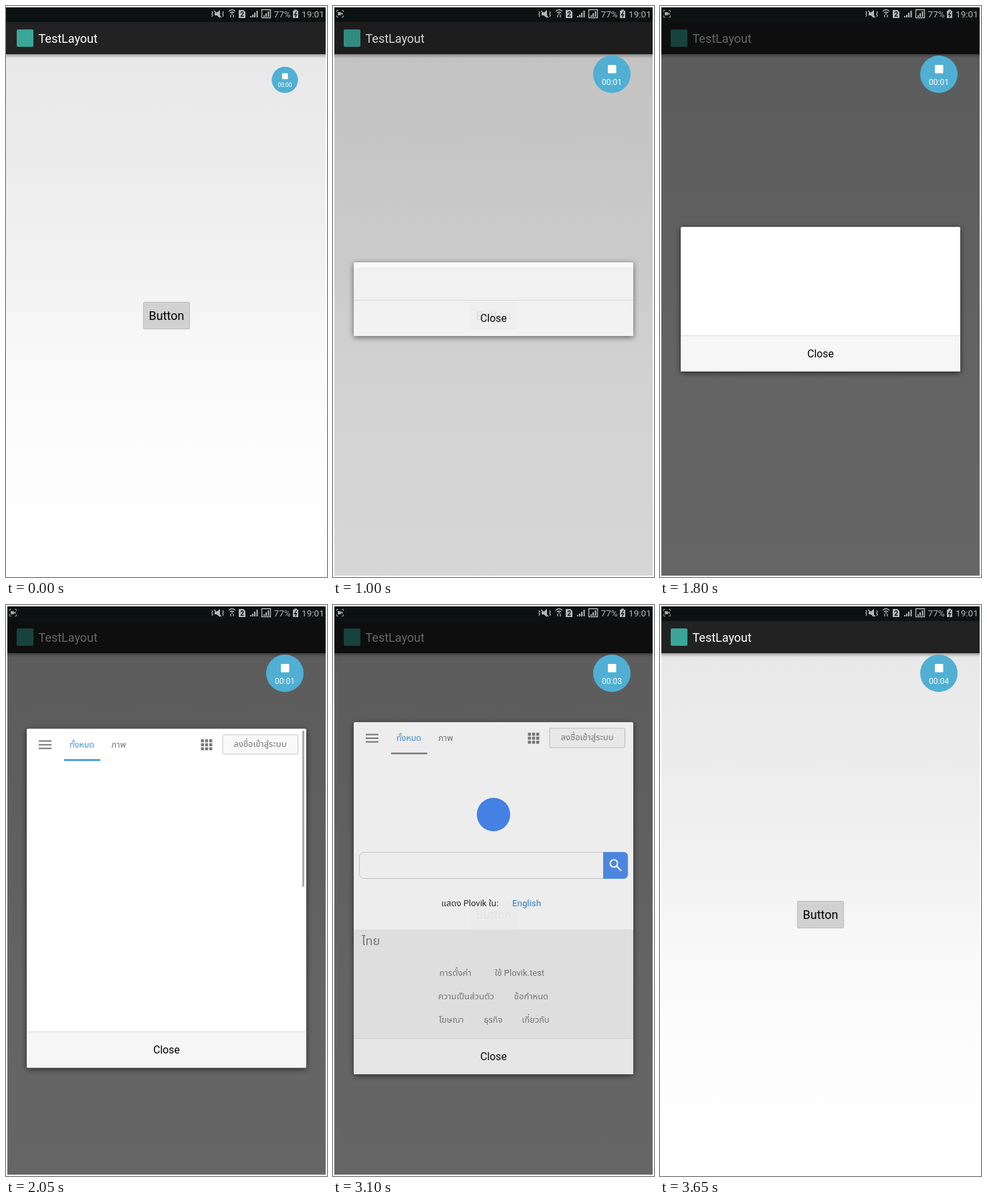
An HTML page that plays this animation: 480x853 px, repeating every 3700 ms.

```html
<!DOCTYPE html>
<html lang="en">
<head>
<meta charset="utf-8">
<title>Dialog demo</title>
<style>
  html, body { margin: 0; width: 100%; height: 100%; overflow: hidden; background: #fff; }
  svg { display: block; }
  text { font-family: Roboto, "Noto Sans Thai", "Noto Sans", sans-serif; }
  .mid { text-anchor: middle; }
  .status { fill: #b4b8b8; font-size: 13.6px; }
  .grey { fill: #777; font-size: 13px; }
  #dialog { filter: drop-shadow(0 2px 4px rgba(0, 0, 0, .6)); }
</style>
</head>
<body>
<svg id="stage" width="480" height="853" viewBox="0 0 480 853">
  <defs>
    <linearGradient id="backdrop" x2="0" y2="1">
      <stop offset="0" stop-color="#e8e8e8"/>
      <stop offset=".2" stop-color="#ececec"/>
      <stop offset=".43" stop-color="#f2f2f2"/>
      <stop offset=".58" stop-color="#f9f9f9"/>
      <stop offset=".8" stop-color="#fdfdfd"/>
      <stop offset="1" stop-color="#fff"/>
    </linearGradient>
    <linearGradient id="barShade" x2="0" y2="1">
      <stop offset="0" stop-opacity=".3"/>
      <stop offset="1" stop-opacity="0"/>
    </linearGradient>
  </defs>

  <!-- activity -->
  <rect y="72" width="480" height="781" fill="url(#backdrop)"/>
  <rect y="24" width="480" height="48" fill="#222"/>
  <rect y="72" width="480" height="6" fill="url(#barShade)"/>
  <rect x="16" y="35" width="25" height="26" rx="2" fill="#3aa699"/>
  <text x="48.5" y="55" font-size="18" fill="#fff">TestLayout</text>
  <rect id="button" x="205.5" y="442.5" width="69" height="40" rx="1" stroke="#bcbcbc"/>
  <text class="mid" x="240" y="469" font-size="18">Button</text>
  <rect id="dim" y="24" width="480" height="829"/>

  <!-- status bar -->
  <rect y="2" width="480" height="22" fill="#0c1111"/>
  <g id="recIcon" fill="none" stroke="#999">
    <path d="M5.5 9V6.5H8M13 6.5h2.5V9M5.5 14v2.5H8M13 16.5h2.5V14"/>
    <path d="M7.500 9.500h4v4h-4zM12 11.500l2-1.500v3z" fill="#aaa"/>
  </g>
  <g fill="#b4b8b8" stroke="#b4b8b8" stroke-width="1.300">
    <path d="M312 10h3l5-4v12l-5-4h-3z" stroke="none"/>
    <path d="M311 7l11 10M308 8l1 2-1 2 1 2-1 2M324 8l1 2-1 2 1 2-1 2" fill="none"/>
    <path d="M333 8q5-5 10 0M335 10.500q3-3 6 0M336 17v-4M340 17v-4M338 10v3" fill="none"/>
    <path d="M348 6h7l3 3v9h-10z" stroke="none"/>
    <path d="M366 17v-2M369 17v-4M372 17v-7M375.500 17V7" fill="none" stroke-width="2"/>
    <path d="M382.500 5.500h13v12h-13z" fill="none"/>
    <path d="M386 16v-2M389 16v-5M392.500 16V8" fill="none" stroke-width="2"/>
    <path d="M429 7h2V5.500h4V7h2v11h-8z" stroke="none"/>
    <path d="M434.500 8l-3 5h3l-2 4" fill="none" stroke="#0c1111"/>
  </g>
  <text class="mid" x="353" y="16" font-size="10" font-weight="700" fill="#0c1111">2</text>
  <text class="status" x="400.500" y="17">77%</text>
  <text class="status" x="442" y="17">19:01</text>

  <!-- dialog -->
  <g id="dialog">
    <rect id="panel" x="31" width="418" rx="2" fill="#fff"/>
    <rect id="blank" x="31" y="391" width="418" height="48" fill="#f6f6f6"/>
    <svg id="page" x="31" width="418">
      <g transform="translate(-31 -175)">
        <g id="header">
          <path d="M49 193.500h19M49 199h19M49 204.500h19" stroke="#777" stroke-width="2"/>
          <text class="mid" x="113.500" y="203" font-size="12.500" font-weight="500" fill="#3f8fdc">ทั้งหมด</text>
          <text class="mid grey" x="168.500" y="203">ภาพ</text>
          <rect id="underline" x="87" y="220.500" width="54" height="2.500"/>
          <path d="M291.500 193h17M291.500 199h17M291.500 205h17" stroke="#777" stroke-width="4.500" stroke-dasharray="4.500 1.700"/>
          <rect x="324" y="184" width="112.500" height="29" rx="1.500" fill="#f9f9f9" stroke="#c4c4c4"/>
          <text class="mid grey" x="380" y="202">ลงชื่อเข้าสู่ระบบ</text>
          <rect id="scrollbar" x="443" y="178" width="3" height="233" fill="#aaa"/>
        </g>
        <g id="content">
          <circle cx="240" cy="313" r="25" fill="#4285f4"/>
          <rect x="39.500" y="369.500" width="401" height="39" rx="7" fill="#fff" stroke="#ccc"/>
          <path d="M404 369h30q7 0 7 7v26q0 7-7 7h-30z" fill="#4a8bef"/>
          <path d="M424 390l7 7M414.500 386a5.500 5.500 0 1 0 11 0a5.500 5.500 0 1 0-11 0" fill="none" stroke="#fff" stroke-width="2.200"/>
          <text x="162" y="449.500" font-size="13" fill="#222">แสดง Plovik ใน:</text>
          <text x="268" y="449.500" font-size="13.300" fill="#2a7de1">English</text>
          <rect x="31" y="484.500" width="418" height="163" fill="#eee"/>
          <text x="43" y="508" font-size="18" fill="#777">ไทย</text>
          <g class="mid grey">
            <text x="183" y="553.500">การตั้งค่า</text>
            <text x="279" y="553.500">ใช้ Plovik.test</text>
            <text x="199" y="588.500">ความเป็นส่วนตัว</text>
            <text x="296.500" y="588.500">ข้อกำหนด</text>
            <text x="177" y="624">โฆษณา</text>
            <text x="239.500" y="624">ธุรกิจ</text>
            <text x="303" y="624">เกี่ยวกับ</text>
          </g>
        </g>
      </g>
    </svg>
    <g id="footer">
      <rect id="closeButton" x="31" y="-54" width="418" height="54" rx="1"/>
      <path d="M31 -53.500h418" stroke="#dadada"/>
      <text class="mid" x="240" y="-21" font-size="15.800">Close</text>
    </g>
  </g>

  <!-- recorder bubble -->
  <g id="bubble">
    <circle cy="-28" r="28" fill="#50afd3"/>
    <rect x="-6" y="-42" width="12.500" height="12.500" rx="1" fill="#fff"/>
    <text id="counter" class="mid" y="-12.500" font-size="12" fill="#fff"></text>
  </g>

  <path d="M0 0h480v853h-2V2H0z" fill="#fff"/>
  <path d="M0 851h480v2H0z" fill="#fff"/>
  <rect id="leftEdge" width="2" height="853" fill="#fff"/>
</svg>

<script>
const LOOP = 3700, STEP = 50, MIDDLE = 438, BAR = 54;
const el = Object.fromEntries([...document.querySelectorAll('[id]')].map(n => [n.id, n]));
const ramp = (t, from, to) => Math.min(1, Math.max(0, (t - from) / (to - from)));
const easeOut = (p, power) => 1 - (1 - p) ** power;
const during = (t, from, to) => t >= from && t < to;
const set = (node, attrs) => {
  for (const name in attrs) node.setAttribute(name, attrs[name]);
};
const show = (node, visible) => set(node, { visibility: visible ? 'visible' : 'hidden' });

function render(t) {
  // recorder
  const scale = 0.7 + 0.3 * easeOut(ramp(t, 0, 300), 2);
  set(el.bubble, { transform: `translate(417 130) scale(${scale})` });
  el.counter.textContent = '00:0' + [750, 2100, 2650, 3550].filter(at => t >= at).length;
  set(el.recIcon, { opacity: ramp(t, 50, 300) });
  show(el.leftEdge, t >= 450);

  // activity
  set(el.button, { fill: during(t, 450, 750) ? '#b5b5b5' : '#d1d1d1' });
  set(el.dim, { opacity: 0.6 * (ramp(t, 915, 1231) - ramp(t, 3147, 3463)) });

  // dialog, growing around its middle
  const half = 55 + 208 * easeOut(ramp(t, 1750, 2150), 2.2);
  const top = MIDDLE - half, bottom = MIDDLE + half;
  set(el.dialog, { opacity: ramp(t, 860, 1015) - ramp(t, 3080, 3260) });
  set(el.panel, { y: top, height: 2 * half });
  set(el.page, { y: top, height: 2 * half - BAR });
  set(el.footer, { transform: `translate(0 ${bottom})` });
  set(el.closeButton, { fill: during(t, 2850, 3050) ? '#e2e2e2' : '#f6f6f6' });

  // web page
  show(el.blank, t < 1800);
  set(el.header, { opacity: t >= 1950 ? 1 : 0 });
  set(el.content, { opacity: t >= 2300 ? 1 : 0 });
  set(el.underline, { fill: t >= 2300 ? '#808080' : '#2f93e0' });
  set(el.scrollbar, { opacity: 1 - ramp(t, 2250, 2400) });
}

function tick() {
  const t = performance.now() % LOOP;
  render(Math.floor(t / STEP) * STEP);
  requestAnimationFrame(tick);
}
tick();
</script>
</body>
</html>
```
